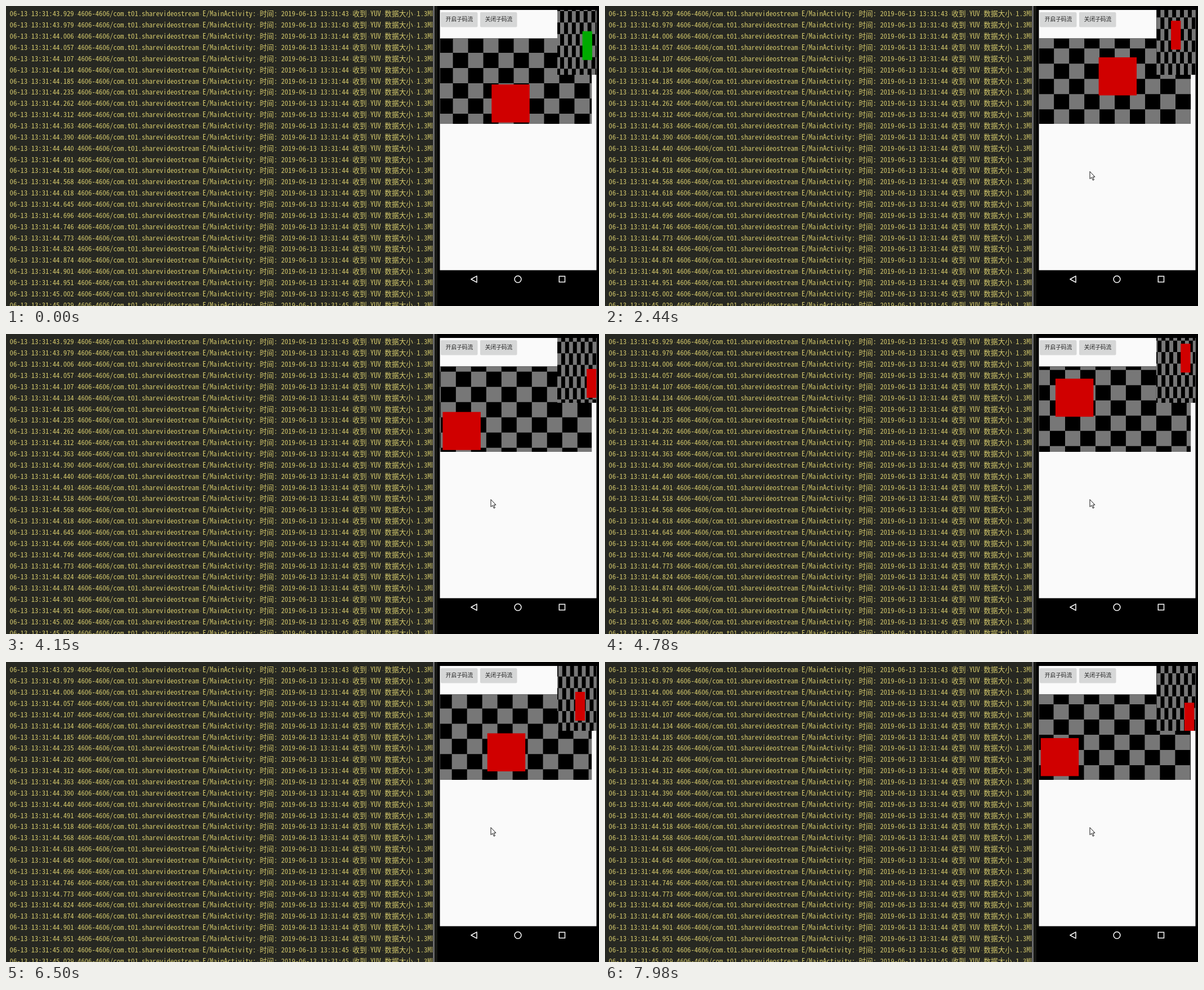
These frames come from a looping animation (1053x532 px, 8 s). An HTML page:

```html
<!DOCTYPE html>
<html lang="zh-CN">
<head>
<meta charset="utf-8">
<title>Sub-stream demo</title>
<style>
  html, body { margin: 0; width: 100%; height: 100%; overflow: hidden; background: #000; }
  svg { display: block; }
  #log { font-weight: 300; fill: #d3c86b; }
  .latin { font-family: "Noto Sans Mono CJK SC", "Liberation Mono", monospace; }
  .han { font-family: "Noto Sans CJK SC", "Noto Sans CJK", sans-serif; font-size: 12.68px; }
  .label { font: 9.7px "Noto Sans CJK SC", "Noto Sans CJK", sans-serif; fill: #222; text-anchor: middle; }
</style>
</head>
<body>
<svg width="1053" height="532" viewBox="0 0 1053 532">
  <rect width="1053" height="532" fill="#000"/>
  <rect x="757" width="9" height="532" fill="#151613"/>
  <rect x="758" width="3" height="532" fill="#6c6c6c"/>
  <svg id="log" width="757" height="532"><rect width="757" height="532" fill="#272822"/></svg>

  <rect x="770.5" y="7" width="278" height="461.5" fill="#fafafa"/>
  <g id="buttons"></g>
  <svg id="main" x="770.4" y="57.3" width="269.8" height="151.8" viewBox="0 0 1280 720" preserveAspectRatio="none"></svg>
  <svg id="sub" x="979" y="7" width="69.5" height="115" viewBox="0 0 1280 720" preserveAspectRatio="none"></svg>

  <g fill="none" stroke="#fff" stroke-width="1.5">
    <path d="M836 478.8V490.2L825.8 484.5Z" stroke-linejoin="round"/>
    <circle cx="909" cy="484.5" r="5.9"/>
    <rect x="982.3" y="479.3" width="10.2" height="10.2"/>
  </g>
  <path id="cursor" d="M0 0V13L3 10.4L5.4 15.5L7.4 14.6L5.1 9.6H9Z" fill="#fff" stroke="#111"/>
</svg>
<script>
const LOOP = 8000;
const byId = id => document.getElementById(id);

function add(parent, tag, attrs, text) {
  const el = document.createElementNS("http://www.w3.org/2000/svg", tag);
  for (const key in attrs) el.setAttribute(key, attrs[key]);
  if (text) el.textContent = text;
  return parent.appendChild(el);
}

// Log: half-width columns of a fixed pitch, a dim dot for each space
const PITCH = 6.34, ROWS = 27, LINE_HEIGHT = 19.86;
const log = byId("log");
const pen = document.createElement("canvas").getContext("2d");
pen.font = '100px "Noto Sans Mono CJK SC", "Liberation Mono", monospace';
const latinSize = 100 * PITCH / pen.measureText("0").width;

function drawLine(row, ms) {
  const y = 18.4 + row * LINE_HEIGHT;
  const stamp = (ms / 1000).toFixed(3);
  const line = `06-13 13:31:${stamp} 4606-4606/com.t01.sharevideostream E/MainActivity: ` +
    `时间:\u00a02019-06-13 13:31:${stamp.slice(0, 2)} 收到 YUV 数据大小 1.3MB`;
  let col = 0;
  for (const part of line.match(/ |[\x21-\x7e\xa0]+|[^\x20-\x7e\xa0]+/g)) {
    const x = 6.6 + col * PITCH;
    const han = part.charCodeAt(0) > 255;
    if (part === " ") add(log, "rect", { x: x + 2.6, y: y - 4, width: 1.2, height: 1.2, fill: "#77724a" });
    else if (han) add(log, "text", { x, y, class: "han" }, part);
    else add(log, "text", { x, y, class: "latin", "font-size": latinSize }, part);
    col += part.length * (han ? 2 : 1);
  }
}

// Frames arrive after two long gaps and a short one, in turn
for (let row = 0, ms = 43929; row < ROWS; row++, ms += row % 3 === 2 ? 27 : 50.4) drawLine(row, ms);

["开启子码流", "关闭子码流"].forEach((text, i) => {
  const x = 772 + 70 * i, group = byId("buttons");
  add(group, "rect", { x, y: 11.6, width: 65.5, height: 26, rx: 2, fill: "#c4c4c4", opacity: .6 });
  add(group, "rect", { x, y: 11, width: 65, height: 25.6, rx: 1.5, fill: "#d6d7d7" });
  add(group, "text", { x: x + 33, y: 26.9, class: "label" }, text);
});

// Test picture of a 1280 x 720 camera: scrolling checkerboard and a bouncing square
const CELL = 128;

function makeVideo(id, mirrored) {
  const root = add(byId(id), "g", mirrored ? { transform: "translate(1280) scale(-1 1)" } : {});
  add(root, "rect", { width: 1280, height: 720, fill: "#000" });
  const cells = add(root, "path", { fill: "#777" });
  const square = add(root, "rect", { width: 320, height: 320 });
  return { cells, square };
}

const bounce = n => { const v = n & 255; return 4 * (v > 128 ? 255 - v : v); };

function drawVideo({ cells, square }, count) {
  const scrollX = count * 3, scrollY = count;
  const parity = Math.floor(scrollX / CELL) + Math.floor(scrollY / CELL);
  let d = "";
  for (let r = 0; r < 7; r++)
    for (let c = 0; c < 11; c++)
      if ((r + c + parity) & 1)
        d += `M${c * CELL - scrollX % CELL} ${r * CELL - scrollY % CELL}h${CELL}v${CELL}h${-CELL}z`;
  cells.setAttribute("d", d);
  square.setAttribute("x", bounce(count * 3));
  square.setAttribute("y", bounce(count * 5));
  square.setAttribute("fill", count & 256 ? "#d00000" : "#00aa00");
}

const mainVideo = makeVideo("main", false);
const subVideo = makeVideo("sub", true);
const FIRST = 244, RATE = 0.0233;       // camera pictures counted per ms
const FROZEN = 390, RESUME = 1400, LAG = 2;

// The pointer comes in from below, presses the button and goes to rest
const entry = { x: 877, y: 535 }, button = { x: 804, y: 22 }, rest = { x: 861, y: 293 };
const ease = (t, from, to) => {
  const p = Math.min(1, Math.max(0, (t - from) / (to - from)));
  return p * p * (3 - 2 * p);
};

function pointerAt(t) {
  const up = ease(t, 400, 1150), down = ease(t, 1380, 1800);
  const axis = k => Math.round(entry[k] + (button[k] - entry[k]) * up + (rest[k] - button[k]) * down);
  return [axis("x"), axis("y")];
}

function captureTime(t) {
  const tick = 78.07;
  return t < 70 ? 0 : Math.min(7980, 880 + tick * Math.floor((t - 880) / tick + 0.15));
}

function render(time) {
  const t = captureTime(time % LOOP);
  const count = Math.round(FIRST + t * RATE);
  drawVideo(mainVideo, t < RESUME ? FROZEN : count - LAG);
  drawVideo(subVideo, count);
  const [x, y] = pointerAt(t);
  byId("cursor").setAttribute("transform", `translate(${x} ${y + .5})`);
}

const start = performance.now();
function loop() {
  render(performance.now() - start);
  requestAnimationFrame(loop);
}
loop();
</script>
</body>
</html>
```
